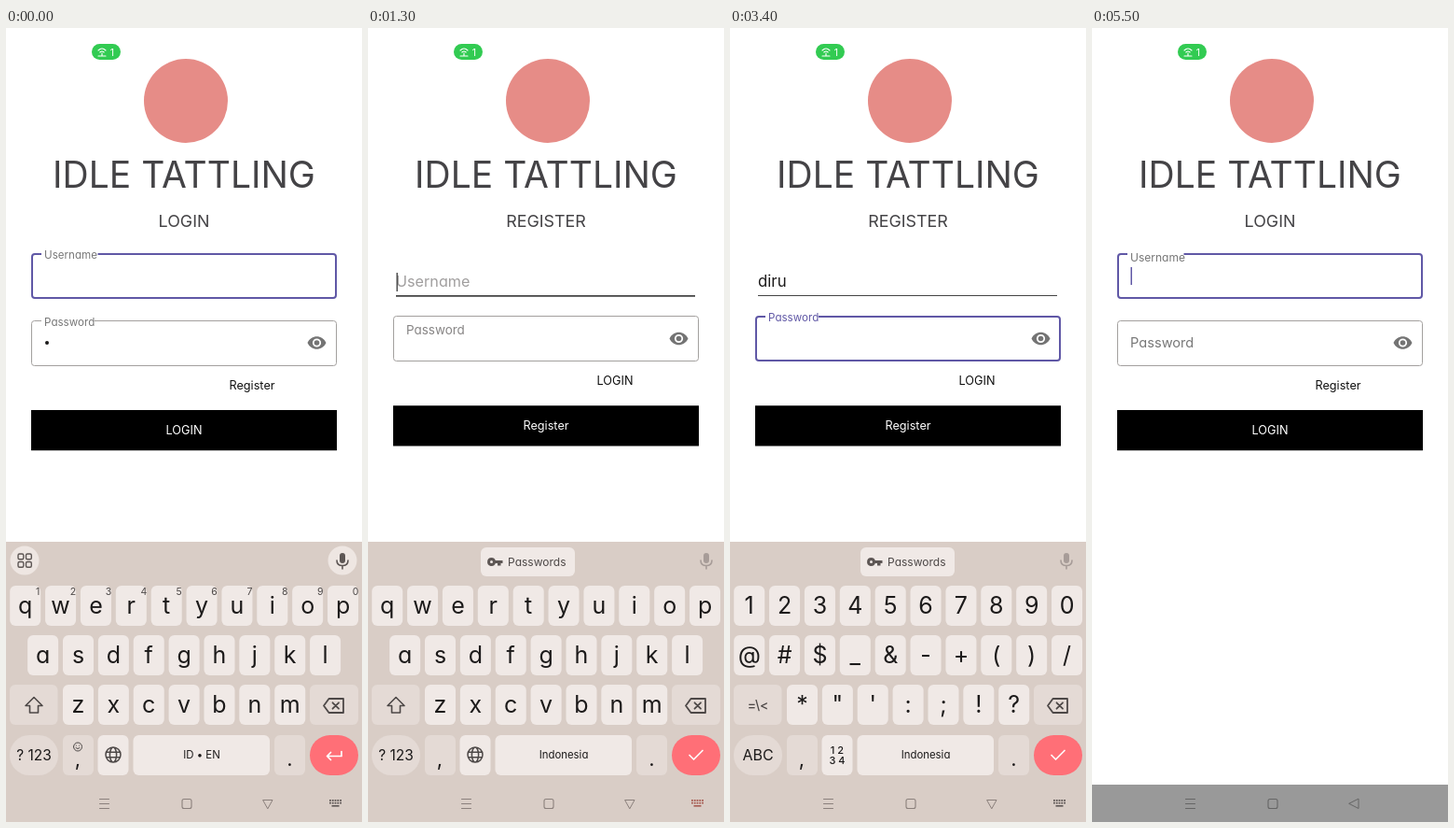
Recreate the animation shown at these times as an HTML page with a canvas. Size 382 by 850 pixels, loop 5600 ms.

```html
<!DOCTYPE html>
<html lang="en">
<head>
<meta charset="utf-8">
<title>Login and register</title>
<style>
  html, body { margin: 0; width: 100%; height: 100%; overflow: hidden; background: #fff; }
  canvas { display: block; width: 382px; height: 850px; }
</style>
</head>
<body>
<canvas id="stage"></canvas>
<script>
const LOOP = 5600, STEP = 100;
const INK = '#1c1a1a', GREY = '#777', PURPLE = '#6058a6', BOARD = '#d9cdc6',
      KEY = '#f0e9e6', DARK_KEY = '#e4dad5', CORAL = '#ff6f77';
const PITCH = 37.87, KEY_W = 33, KEY_H = 43;
const ROW_Y = [597, 650, 703, 757];
const LETTERS = ['qwertyuiop', 'asdfghjkl', 'zxcvbnm'];
const SYMBOLS = ['1234567890', '@#$_&-+()/', '*"\':;!?'];

// Each press shows a popup; the character is entered when it ends.
const PRESSES = [
  { key: 'd', at: 1600 }, { key: 'i', at: 1960 }, { key: 'r', at: 2260 },
  { key: 'u', at: 2560 }, { key: '1', at: 3900 }
].map(p => ({ ...p, end: p.at + 100 }));
const SUGGESTIONS = {
  d: ['d', 'done', 'do'], di: ['di', 'did', 'dim'],
  dir: ['dir', 'dirt', 'dire'], diru: ['diru', 'dirt', 'dirty']
};

const canvas = document.getElementById('stage');
const ratio = window.devicePixelRatio || 1;
canvas.width = 382 * ratio;
canvas.height = 850 * ratio;
const c = canvas.getContext('2d');

const between = (t, a, b) => t >= a && t < b;
const lerp = (a, b, p) => a + (b - a) * p;
function ease(t, from, to) {
  const p = Math.min(1, Math.max(0, (t - from) / (to - from)));
  return p * p * (3 - 2 * p);
}
const blink = (t, start) => t >= start && Math.floor((t - start) / 500) % 2 === 0;

// The typeface on the phone has a single-storey a.
const singleStorey = s => String(s).replace(/a/g, 'ɑ');

function text(s, x, y, size, color = INK, align = 'center', weight = 400) {
  c.font = `${weight} ${size}px Inter, sans-serif`;
  c.textAlign = align;
  c.fillStyle = color;
  c.fillText(singleStorey(s), x, y);
}
function rect(x, y, w, h, color, r = 0) {
  c.beginPath();
  c.roundRect(x, y, w, h, r);
  c.fillStyle = color;
  c.fill();
}
function outline(x, y, w, h, color, r, width) {
  c.beginPath();
  c.roundRect(x, y, w, h, r);
  c.strokeStyle = color;
  c.lineWidth = width;
  c.stroke();
}
function disc(x, y, r, color) {
  c.beginPath();
  c.arc(x, y, r, 0, 7);
  c.fillStyle = color;
  c.fill();
}
// Draws path data around a centre point.
function icon(x, y, data, color, width = 1.5, filled = false) {
  c.save();
  c.translate(x, y);
  c.lineWidth = width;
  c.lineJoin = c.lineCap = 'round';
  c.strokeStyle = c.fillStyle = color;
  const path = new Path2D(data);
  filled ? c.fill(path, 'evenodd') : c.stroke(path);
  c.restore();
}

function header(title) {
  rect(92, 17, 31, 17, '#32cb52', 8.5);
  icon(103, 26, 'M-4 4H4M-4-2Q0-6 4-2M-2.2 0Q0-2 2.2 0M0 1V4', '#fff', 1.1);
  text('1', 114, 30, 10.5, '#fff');
  disc(193, 78, 45, '#e68c87');
  text('IDLE TATTLING', 191, 171, 39, '#444346');
  text(title, 191, 212.5, 17.9, '#444346');
}

function outlinedField(top, label, { floated = 0, focused = false, labelColor = GREY } = {}) {
  const line = focused ? 2 : 1;
  outline(27 + line / 2, top + line / 2, 328 - line, 49 - line, focused ? PURPLE : '#a3a09e', 3, line);
  const size = lerp(14.6, 11.6, floated);
  if (floated > .5) rect(38, top - 1, label === 'Username' ? 60.5 : 57, 4, '#fff');
  text(label, 41, lerp(top + 24, top + 2, floated) + size * .36, size, labelColor, 'left');
}

function eye(y) {
  icon(333.5, y, 'M-10 0C-6-9 6-9 10 0C6 9-6 9-10 0ZM-4.6 0A4.6 4.6 0 1 0 4.6 0A4.6 4.6 0 1 0-4.6 0Z', '#747474', 1, true);
  disc(333.5, y, 2.8, '#747474');
}

function actions(link, button, linkX, y) {
  text(link, linkX, y + 4.6, 12.7, '#111');
  rect(27, y + 26.5, 328, 43.3, '#000');
  text(button, 191, y + 52.5, 12.7, '#fff');
}

function loginScreen(t) {
  const returning = t > 2000;
  const focused = !returning || t >= 5370;
  header('LOGIN');
  outlinedField(241, 'Username', { focused, floated: returning ? ease(t, 5370, 5540) : 1 });
  if (blink(t, returning ? 5450 : 500)) rect(41.5, 256, 1.5, 19, PURPLE);
  outlinedField(313, 'Password', { floated: returning ? 0 : 1 });
  if (!returning) disc(44, 337, 2, INK);
  eye(337);
  actions('Register', 'LOGIN', 264, 382.5);
}

function registerScreen(t, name, password) {
  const nameFocused = between(t, 1205, 2880);
  header('REGISTER');
  text(name || 'Username', 30, 277, name ? 16.8 : 16.2, name ? INK : '#a09e9e', 'left');
  const nameEnd = name ? 30 + c.measureText(name).width : 30.5;
  rect(30, 286, 321, nameFocused ? 1.8 : 1, '#444');
  const typing = PRESSES.filter(p => p.end <= t).pop();
  if (nameFocused && blink(t, typing ? typing.end : 1210)) rect(nameEnd, 262, 1.4, 20, '#444');

  const focused = between(t, 755, 1205) || t >= 2880;
  const floated = t < 1205 ? ease(t, 755, 925)
    : t < 2880 ? 1 - ease(t, 1205, 1370) : ease(t, 2880, 3050);
  outlinedField(308, 'Password', { focused, floated, labelColor: focused ? PURPLE : '#868484' });
  text(password, 41, 337.5, 15, INK, 'left');
  const passwordEnd = password ? 42 + c.measureText(password).width : 41.5;
  const start = password ? typing.end : t < 2000 ? 755 : 2880;
  if (focused && blink(t, start)) rect(passwordEnd, 323, 1.5, 19, PURPLE);
  eye(332.5);
  actions('LOGIN', 'Register', 265, 377.7);
}

function microphone(x, color) {
  icon(x, 570, 'M0-8Q3-8 3-5V0Q3 3 0 3Q-3 3-3 0V-5Q-3-8 0-8Z', color, 1, true);
  icon(x, 570, 'M-6 0Q-6 5.5 0 5.5Q6 5.5 6 0M0 6V9', color, 1.6);
}

function toolbar(t, textMode, name, password) {
  if (textMode) {
    disc(20, 570, 15.5, '#eee6e2');
    for (const [x, y] of [[13, 563], [21.5, 563], [13, 571.5], [21.5, 571.5]])
      outline(x, y, 5.8, 5.8, '#5d5654', 1.5, 1.4);
    disc(361, 570, 15.5, '#eee6e2');
    microphone(361, '#5d5654');
    const words = SUGGESTIONS[name];
    if (!words) return;
    words.forEach((word, i) => text(word, [87, 190, 299][i], 576, 16));
    for (const x of [135, 244]) rect(x, 560, 1, 21, '#c5b9b3');
    return;
  }
  microphone(t < 2000 ? 363 : 361, '#a79c98');
  if (password) return;
  const x = t < 2000 ? 121 : 140;
  rect(x, 556, 101, 31, KEY, 6);
  icon(x + 15, 571.5, 'M-3.5-4.5A4.5 4.5 0 1 0 .8 1.5H3V4H6.5V1.5H8.5V-1.5H.8A4.5 4.5 0 0 0-3.5-4.5ZM-5 0A1.5 1.5 0 1 0-2 0A1.5 1.5 0 1 0-5 0Z', '#5d5654', 1, true);
  text('Passwords', x + 29, 576, 12, '#4d4847', 'left');
}

const rowLeft = (row, r) => 4.2 + (r === 2 ? PITCH * 1.5 : (10 - row.length) * PITCH / 2);

function keyRows(rows, textMode, pressed) {
  rows.forEach((row, r) => {
    const left = rowLeft(row, r), top = ROW_Y[r];
    [...row].forEach((char, i) => {
      const x = left + i * PITCH, down = char === pressed;
      if (!down) rect(x, top, KEY_W, KEY_H, KEY, 6);
      text(char, x + KEY_W / 2, top + 29.5, 25, down ? '#a59b97' : INK);
      if (textMode && r === 0)
        text((i + 1) % 10, x + 30, top + 10, 10.5, down ? '#b5aaa5' : '#4d4847');
    });
  });
}

function popup(rows, char) {
  const r = rows.findIndex(row => row.includes(char));
  if (r < 0) return;
  const x = rowLeft(rows[r], r) + rows[r].indexOf(char) * PITCH + KEY_W / 2, y = ROW_Y[r] - 31;
  disc(x, y, 26.3, '#a99d98');
  text(char, x, y + 9, 27);
  for (const dx of [-3, 0, 3]) disc(x + dx, y + 20, 1, INK);
}

function bottomRow(textMode, symbols) {
  const y = ROW_Y[3];
  rect(4, y, 52, KEY_H, DARK_KEY, 21);
  text(symbols ? 'ABC' : '? 123', 30, 783.5, symbols ? 16 : 15.5);
  rect(61, y, KEY_W, KEY_H, DARK_KEY, 6);
  text(',', 77, 790, 22);
  if (textMode) {
    icon(77, 769.5, 'M-4.5 0A4.5 4.5 0 1 0 4.5 0A4.5 4.5 0 1 0-4.5 0M-2 1.2Q0 3.2 2 1.2M-1.6-1.4V-1.3M1.6-1.4V-1.3', '#4d4847', 1);
  }
  rect(98.5, y, KEY_W, KEY_H, KEY, 6);
  if (symbols) {
    text('1 2', 115, 776.5, 11, INK, 'center', 500);
    text('3 4', 115, 788, 11, INK, 'center', 500);
  } else {
    icon(115, 778, 'M-8 0A8 8 0 1 0 8 0A8 8 0 1 0-8 0M-3.6 0A3.6 8 0 1 0 3.6 0A3.6 8 0 1 0-3.6 0M-7.4-2.8H7.4M-7.4 2.8H7.4', '#4d4847', 1.5);
  }
  rect(136.5, y, 146.5, KEY_H, KEY, 6);
  text(textMode ? 'ID • EN' : 'Indonesia', 210, 782.3, 11.4);
  rect(288, y, KEY_W, KEY_H, DARK_KEY, 6);
  text('.', 304.5, 790, 22);
  rect(326, y, 52, KEY_H, CORAL, 21.5);
  icon(352, 778.5, textMode ? 'M8-4V1H-7M-3.5-3L-7.5 1L-3.5 5' : 'M-7 0L-2.5 4.5L7-5', '#fff', 1.7);
}

function keyboard(t, name, password) {
  const textMode = t < 1000 || between(t, 1400, 2880);
  const symbols = t >= 3250;
  const rows = symbols ? SYMBOLS : LETTERS;
  const press = PRESSES.find(p => between(t, p.at, p.end));
  rect(0, 550, 382, 300, BOARD);
  toolbar(t, textMode, name, password);
  keyRows(rows, textMode, press && press.key);
  rect(4, ROW_Y[2], 51.5, KEY_H, DARK_KEY, 6);
  if (symbols) text('=\\<', 30, 730, 14, '#4d4847', 'center', 500);
  else icon(30, 725, 'M0-8.5L9 .5H4.5V8H-4.5V.5H-9Z', '#4d4847', 1.6);
  rect(326, ROW_Y[2], 52, KEY_H, DARK_KEY, 6);
  icon(352, 725.5, 'M-11 0L-5.5-7.5H10V7.5H-5.5ZM-1.5-3.2L5 3.2M5-3.2L-1.5 3.2', '#4d4847', 1.8);
  bottomRow(textMode, symbols);
  if (press) popup(rows, press.key);
}

function navigationBar(t, open) {
  rect(0, 810, 382, 40, open ? BOARD : '#999');
  const color = open ? '#8b807c' : '#656565';
  icon(105.5, 830.5, 'M-5-5H5M-5 0H5M-5 5H5', color, 1);
  outline(189, 825.5, 10, 10, color, 2, 1.1);
  icon(281, 830.5, open ? 'M-5-4H5L0 5Z' : 'M5-5V5L-5 0Z', color, 1);
  if (!open) return;
  const dots = between(t, 1000, 1400) ? '#a65a50' : '#5d5654';
  for (let i = 0; i < 10; i++)
    rect(347 + (i % 5) * 2.8, 826 + Math.floor(i / 5) * 2.8, 1.8, 1.8, dots);
  rect(349.5, 832, 8, 1.6, dots);
}

function draw(t) {
  c.setTransform(ratio, 0, 0, ratio, 0, 0);
  rect(0, 0, 382, 850, '#fff');
  const entered = PRESSES.filter(p => p.end <= t).map(p => p.key).join('');
  const name = entered.slice(0, 4), password = entered.slice(4);
  if (between(t, 400, 5000)) registerScreen(t, name, password);
  else loginScreen(t);

  const raised = t < 800 ? 1 - ease(t, 300, 550)
    : ease(t, 1000, 1250) - ease(t, 4640, 4850);
  if (raised > 0) {
    c.save();
    c.translate(0, (1 - raised) * 260);
    keyboard(t, name, password);
    c.restore();
  }
  navigationBar(t, raised > 0);
}

function tick(now) {
  draw(Math.floor(now % LOOP / STEP) * STEP);
  requestAnimationFrame(tick);
}
draw(0);
requestAnimationFrame(tick);
</script>
</body>
</html>
```
